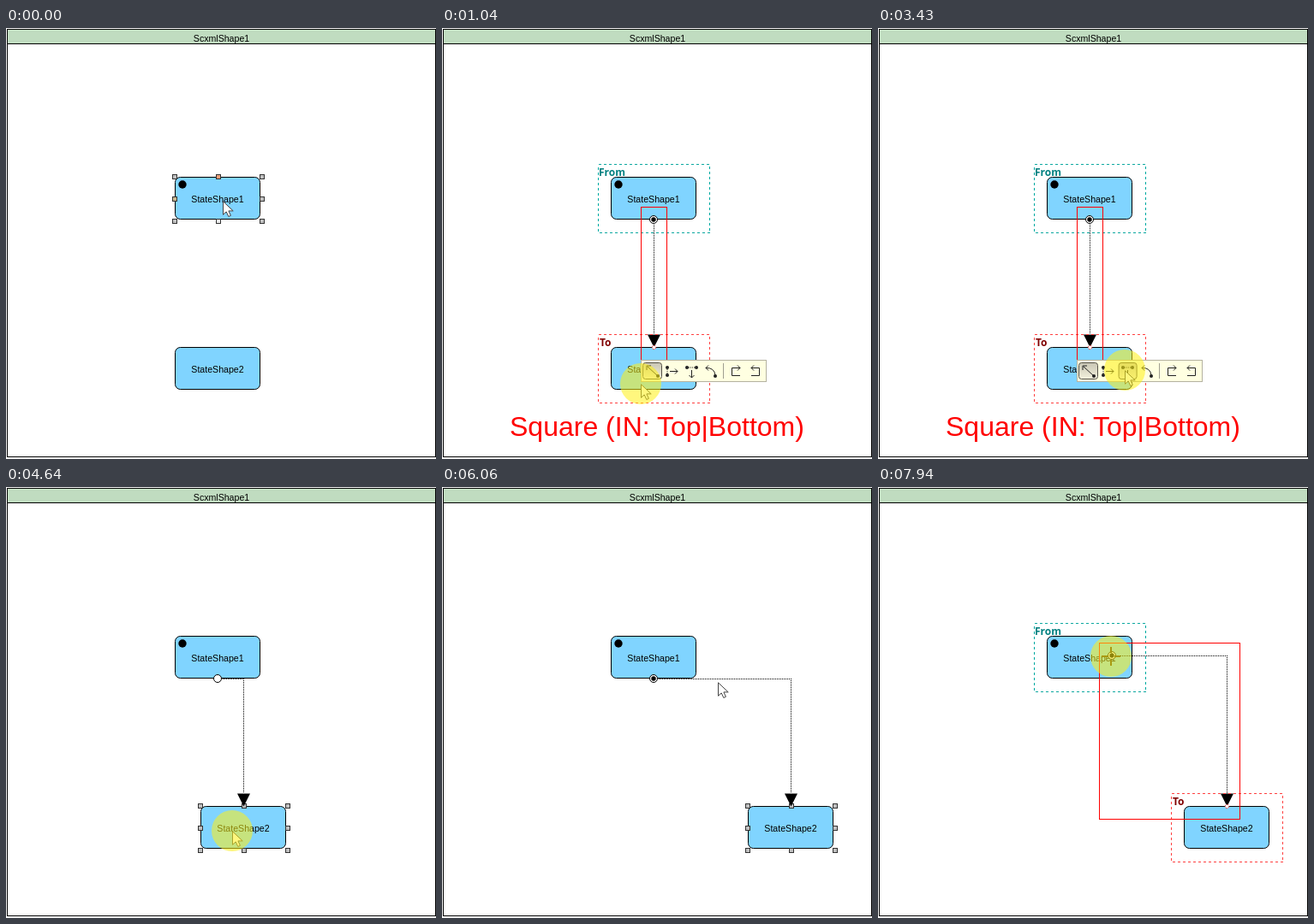
Animation, 502 px wide and 504 px high, one loop 8 s. Source, as an HTML page:

```html
<!DOCTYPE html>
<html lang="en">
<head>
<meta charset="utf-8">
<title>State chart editor</title>
<style>
html, body { margin: 0; width: 100%; height: 100%; overflow: hidden; background: #fff; }
svg { display: block; width: 502px; height: 504px; }
text { font-family: "Liberation Sans", Arial, sans-serif; font-size: 10.6px; text-anchor: middle; }
.crisp { shape-rendering: crispEdges; }
.state { fill: #80d4ff; stroke: #000; }
.zone { fill: none; stroke-dasharray: 3 3; shape-rendering: crispEdges; }
.zone-label { font: 700 12px "Open Sans", "Noto Sans", sans-serif; text-anchor: start; }
.grip rect { fill: #c0c0c0; stroke: #333; shape-rendering: crispEdges; }
.wire { fill: none; stroke: #000; stroke-dasharray: 1 1; shape-rendering: crispEdges; }
.caption { font-size: 32px; fill: #f00; text-anchor: start; }
.icon { fill: none; stroke: #222; }
.dot { fill: #222; stroke: none; }
.button { stroke: #55524a; fill: url(#press); }
</style>
</head>
<body>
<svg viewBox="0 0 502 504">
  <defs>
    <linearGradient id="press" x2="0" y2="1">
      <stop offset="0" stop-color="#c9c6b4"/>
      <stop offset="1" stop-color="#f3f1dd"/>
    </linearGradient>
    <g id="grips" class="grip"></g>
  </defs>

  <g class="crisp" stroke="#000">
    <rect x="1.5" y="1.5" width="500" height="500" fill="#fff"/>
    <rect x="1.5" y="1.5" width="500" height="17" fill="#c0dcc0"/>
  </g>
  <text x="251.5" y="16">ScxmlShape1</text>

  <rect class="state" x="197.5" y="174.5" width="99" height="49" rx="6"/>
  <circle cx="206" cy="183" r="4.7"/>
  <text x="247" y="204">StateShape1</text>
  <g id="grips1">
    <use href="#grips" y="174"/>
    <g class="crisp" stroke="#333">
      <rect x="245.5" y="171.5" width="5" height="5" fill="#f0a078"/>
      <rect x="194.5" y="197.5" width="5" height="5" fill="#c8b890"/>
      <rect x="245.5" y="223.5" width="5" height="5" fill="#eee"/>
    </g>
  </g>

  <g id="shape2">
    <rect class="state" x="197.5" y="373.5" width="99" height="49" rx="6"/>
    <text x="247" y="403">StateShape2</text>
    <use id="grips2" href="#grips" y="373"/>
  </g>

  <g id="link">
    <path id="wire" class="wire"/>
    <path id="head" d="M-7.5 358.5h15l-7.5 15z"/>
    <g id="tail">
      <circle r="4.5" fill="#fff" stroke="#000"/>
      <circle id="core" r="2.7"/>
    </g>
  </g>

  <g id="zones">
    <rect class="zone" x="182.5" y="159.5" width="130" height="80" stroke="#00a8a0"/>
    <text class="zone-label" x="183" y="173" fill="#008080">From</text>
    <g id="to">
      <rect class="zone" x="182.5" y="358.5" width="130" height="80" stroke="#ff4040"/>
      <text class="zone-label" x="184" y="372" fill="#800000">To</text>
      <circle cx="247.5" cy="373.5" r="2.2" fill="#fff" stroke="#d33" stroke-dasharray="2 1"/>
    </g>
    <rect id="bounds" class="crisp" fill="none" stroke="#f00"/>
  </g>

  <text id="caption" class="caption" x="79" y="477">Square (IN: Top|Bottom)</text>

  <g id="bar">
    <rect class="crisp" x=".5" y=".5" width="146" height="25" fill="#ffffe1" stroke="#b4b2a0"/>
    <rect class="button" x="2.5" y="3.5" width="22" height="19" rx="3"/>
    <rect id="hover" class="button" y="3.5" width="21" height="19" rx="3"/>
    <g class="icon">
      <path d="M8 8L20 19M7 12V7h5"/>
      <circle class="dot" cx="20" cy="19" r="2"/>
      <circle class="dot" cx="31" cy="9" r="2"/>
      <circle class="dot" cx="31" cy="18" r="2"/>
      <path d="M31 9V18" stroke-dasharray="1 1"/>
      <path d="M34 13.5h9M40 10.5l3 3-3 3"/>
      <circle class="dot" cx="54" cy="9" r="2"/>
      <circle class="dot" cx="65" cy="9" r="2"/>
      <path d="M54 9H65" stroke-dasharray="1 1"/>
      <path d="M59.5 12v9M56.5 18l3 3 3-3"/>
      <path d="M76 9.5Q86 9 87 18M79 6.5l-3 3 3 3"/>
      <circle class="dot" cx="87" cy="19" r="2"/>
      <path d="M96.500 4V22" stroke="#a09e90"/>
      <path id="turn" d="M116 18.500H106.500V9.500H116M113 6.500l3 3-3 3"/>
      <use href="#turn" transform="matrix(-1 0 0 1 245 0)"/>
    </g>
  </g>

  <path id="arrow" d="M.5 .8V16.300L4.200 12.900L6.800 18.500L9.400 17.300L6.900 11.900H12.200Z" fill="#fff" stroke="#444"/>
  <path id="cross" d="M0 -11V-4M0 4V11M-11 0H-4M4 0H11" stroke="#403010" stroke-width="2"/>
  <circle id="glow" r="24" fill="#fff014" fill-opacity=".55"/>
</svg>
<script>
const LOOP = 8000, STEP = 70;
const el = id => document.getElementById(id);
const show = (id, on) => { el(id).style.display = on ? '' : 'none'; };
const move = (id, x, y = 0) => el(id).setAttribute('transform', `translate(${x} ${y})`);
const within = (t, ...spans) => spans.some(([a, b]) => t >= a && t < b);

// time, x, y of the pointer tip
const path = [
  [0, 253, 202], [340, 205, 171], [530, 205, 171], [830, 228, 397],
  [970, 232, 416], [1240, 232, 416], [1500, 234, 416], [2420, 238, 413],
  [2770, 288, 400], [4090, 288, 400], [4430, 236, 402], [4640, 264, 402],
  [4850, 366, 402], [5060, 398, 402], [5320, 398, 402], [5790, 317, 216],
  [5990, 320, 222], [6060, 322, 228], [6600, 322, 228], [7070, 293, 230],
  [7140, 296, 225], [7210, 296, 225], [7740, 271, 192], [7940, 272, 198]
];
const holds = [[1500, 2420], [5790, 5990], [7740, 7940]];

function pointer(t) {
  let i = path.length - 1;
  while (path[i][0] > t) i--;
  const [t0, x0, y0] = path[i];
  const next = path[i + 1];
  if (!next || within(t, ...holds)) return [x0, y0];
  const p = Math.floor((t - t0) / STEP) * STEP / (next[0] - t0);
  return [x0 + (next[1] - x0) * p, y0 + (next[2] - y0) * p].map(Math.round);
}

function draw(t) {
  const [x, y] = pointer(t);
  const linked = t >= 1040;
  const zones = within(t, [1040, 4430], [6460, LOOP]);
  const dragged = t < 4430 ? 0 : t < 5060 ? Math.max(0, Math.floor((x - 234) / 10) * 10) : 160;

  show('grips1', t < 970);
  show('grips2', within(t, [4430, 6460]));
  move('shape2', dragged);
  move('to', dragged);

  // the link's start, then its corner and end
  const [sx, sy] = t >= 7210 ? [x + 1, y - 1] : t >= 6460 ? [297, 224] : [247, 224];
  const ex = 247 + dragged;
  show('link', linked);
  el('wire').setAttribute('d', `M${sx} ${sy + .5}H${ex + .5}V358`);
  move('head', ex + .5);
  move('tail', sx, sy);
  show('core', zones || within(t, [5720, 6460]));

  show('zones', zones);
  const box = { x: sx - 14.5, y: sy - 14.5, width: ex - sx + 30, height: 388 - sy + 15 };
  for (const k in box) el('bounds').setAttribute(k, box[k]);

  show('caption', within(t, [1040, 3630]));

  const [bx, by] = t < 1000 ? [198, 147] : [232, 388];
  const cell = Math.floor((x - bx - 2) / 23.3);
  const inside = y > by + 2 && y < by + 25 && cell > 0 && cell < 4;
  show('bar', within(t, [200, 900], [1040, 3630]));
  move('bar', bx, by);
  show('hover', inside);
  el('hover').setAttribute('x', 2.5 + cell * 23.3);

  const grab = t >= 7140;
  show('arrow', !grab && !within(t, [3630, 3830]));
  show('cross', grab);
  show('glow', within(t, [400, 530], [970, 1240], [3430, 3630], [4430, 5320], [6390, 6600], [7210, LOOP]));
  for (const id of ['arrow', 'cross', 'glow']) move(id, x, y);
}

for (const dx of [197, 248, 299])
  for (const dy of [0, 26, 52]) {
    if (dx === 248 && dy === 26) continue;
    const r = document.createElementNS('http://www.w3.org/2000/svg', 'rect');
    const box = { x: dx - 2.5, y: dy - 2.5, width: 5, height: 5 };
    for (const k in box) r.setAttribute(k, box[k]);
    el('grips').append(r);
  }

const start = performance.now();
function tick() {
  draw((performance.now() - start) % LOOP);
  requestAnimationFrame(tick);
}
tick();
</script>
</body>
</html>
```
